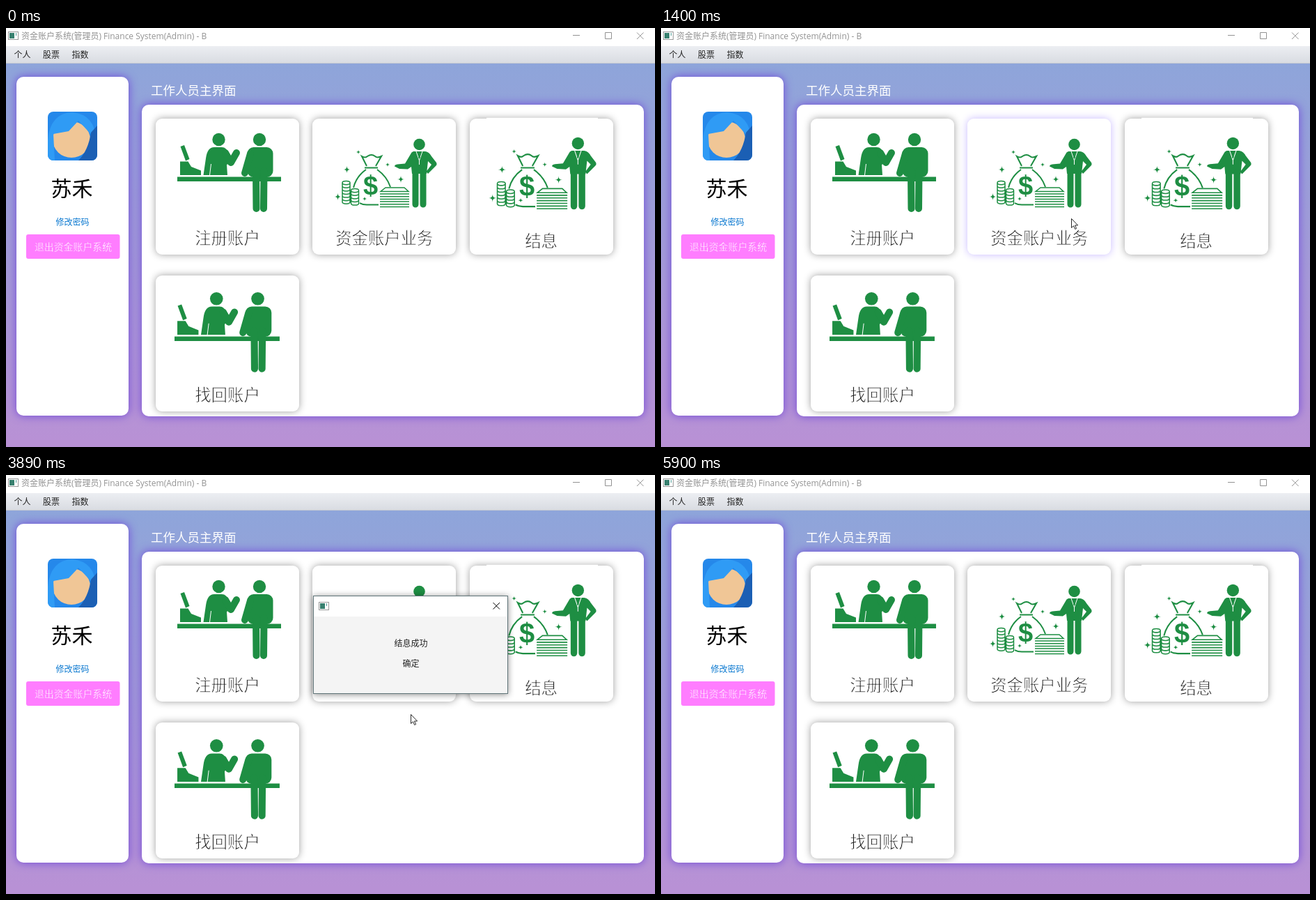
An HTML page that plays this animation: 932 by 601 pixels, repeating every 6010 ms.

```html
<!DOCTYPE html>
<html lang="zh-CN">
<head>
<meta charset="utf-8">
<title>资金账户系统</title>
<style>
html, body { margin: 0; width: 100%; height: 100%; overflow: hidden; }
#app { position: absolute; left: 0; top: 0; width: 932px; height: 601px; overflow: hidden;
  background: linear-gradient(#8ea5da 50px, #b891d5 590px); }
#app div, svg { position: absolute; }
.title { width: 932px; height: 26px; background: #fff; }
.menu { top: 26px; width: 932px; height: 25px; background: linear-gradient(#eceef2, #d9dce2); border-bottom: 1px solid #c3c8d2; box-sizing: border-box; }
.panel { background: #fff; border-radius: 10px; box-shadow: 0 0 13px #7048d8; }
.side { left: 15px; top: 70px; width: 161px; height: 486px; }
.main { left: 195px; top: 110px; width: 721px; height: 447px; overflow: hidden; }
.card { width: 206px; height: 195.5px; border-radius: 9px; background: #fff; box-shadow: 0 0 11px rgba(0,0,0,.38); }
.card.hover { box-shadow: 0 0 12px #c8baff; }
.card.press { box-shadow: 0 0 12px 1px #8450ff; }
svg { left: 0; top: 0; }
text { font-family: "Open Sans", "Noto Sans CJK SC", "Noto Sans CJK", sans-serif; font-size: 12px; }
.mid { text-anchor: middle; }
/* a background-coloured outline thins the strokes */
.label { font-size: 23.4px; fill: #111; stroke: #fff; stroke-width: .8; text-anchor: middle; }
.exit { font-size: 13.9px; fill: #fff; stroke: #ff7dff; stroke-width: .35; text-anchor: middle; }
.icon { fill: #1e8e43; }
.line { fill: none; stroke: #1e8e43; stroke-width: 2; }
.thin { stroke-width: 1.5; }
.limb { fill: none; stroke: #1e8e43; stroke-width: 10; stroke-linecap: round; stroke-linejoin: round; }
.dialog { filter: drop-shadow(0 1px 5px rgba(0,0,0,.45)); }
</style>
</head>
<body>
<div id="app">
  <div class="title"></div>
  <div class="menu"></div>
  <div class="panel side"></div>
  <div class="panel main" id="main"></div>
  <svg width="932" height="601">
    <defs>
      <g id="win">
        <rect x=".5" y=".5" width="14" height="11" fill="#fff" stroke="#9a9a9a"/>
        <rect x="2" y="2" width="7" height="8" fill="#38806f"/>
        <path d="M11.5 2V6" stroke="#4a9b94"/>
      </g>
      <g id="desk" class="icon">
        <path d="M246 213.5H395V220H246ZM250.5 170 256 168 263.5 188 258 190.5ZM250 191.5H261.500L266 199 280 204.500V211H250Z"/>
        <circle cx="305.5" cy="160" r="9.2"/>
        <path d="M283.500 211 287 187Q289 171 299 171H310Q317 171 319 180V195L317 196 318 211Z"/>
        <path class="limb" d="M315 179 323 193 331 179"/>
        <path d="M292.500 211 294.500 195" stroke="#fff"/>
        <circle cx="364" cy="160" r="9.2"/>
        <rect x="346.5" y="171" width="37" height="43" rx="9"/>
        <path class="limb" d="M351 180 343 208M359 205 359.500 259M370.500 205 370 259"/>
      </g>
      <g id="money" class="icon">
        <path class="line" d="M518 198 511 184Q516 187 519 184 525 180 530 184 533 187 539 184L531 198M515 200.500H534M517 203Q503 213 499 229M533 203Q547 213 552 228M508 251Q512 253.500 518 253.500H535"/>
        <text x="523.500" y="239" class="mid" style="font:bold 38px 'Liberation Sans',Arial,sans-serif">$</text>
        <path class="line thin" d="M545 229H572L578 234.500H538Z"/>
        <g id="piles"></g>
        <circle cx="593.500" cy="167" r="8.3"/>
        <path d="M585 177H602Q608 178 611 184L618 193Q619.500 196 617 198L606 209 603.500 206 611 196 606 191 604 209H583L582 199 577 202.500 565 202 558 198.500Q558 196 562 195.500L573 194.500 581 181Q582 178 585 177Z"/>
        <path class="limb" style="stroke-width:9" d="M588 207V253M599 207V253"/>
        <path d="M589 177 593.500 190 598 177M593.500 190V196" fill="none" stroke="#fff"/>
        <path d="M592 179H595L594.500 187H592.500Z"/>
      </g>
      <clipPath id="round"><rect x="60" y="120" width="71" height="70" rx="8"/></clipPath>
    </defs>

    <use href="#win" x="3" y="5"/>
    <g id="bar">
      <text x="22" y="16">资金账户系统(管理员)</text>
      <text x="140" y="16">Finance System(Admin) - B</text>
      <path d="M814 10.500H824M860.500 6.500H869.500V15.500H860.500ZM906 6.500 915.500 16M915.500 6.500 906 16" fill="none" stroke="currentColor"/>
    </g>
    <g fill="#222">
      <text x="11.500" y="43">个人</text><text x="53" y="43">股票</text><text x="94.500" y="43">指数</text>
    </g>

    <g clip-path="url(#round)">
      <path d="M60 120H131V190H60Z" fill="#2588ea"/>
      <ellipse cx="94" cy="160" rx="27" ry="26" fill="#f0c696"/>
      <path d="M60 160Q64 122 95 121 128 124 129 160L104 133 90 148 68 152 70 190H60Z" fill="#2f9bf5"/>
      <path d="M122 150 131 140V190H104Q118 176 122 150Z" fill="#1b5fb4"/>
    </g>
    <text x="94.500" y="241" class="mid" style="font-size:30px">苏禾</text>
    <text x="95.500" y="282.500" class="mid" fill="#0a78d0">修改密码</text>
    <rect id="focus" x="26.500" y="267.500" width="139" height="21" fill="none" stroke="#0c93d8" stroke-dasharray="3 2"/>
    <rect x="29" y="296" width="134.500" height="35" rx="3" fill="#ff7dff"/>
    <text class="exit" x="96.500" y="319">退出资金账户系统</text>
    <text x="208" y="95.700" fill="#fff" style="font-size:17.500px">工作人员主界面</text>

    <rect x="690" y="128.800" width="160" height="3" fill="#fff"/>
    <use href="#desk"/>
    <use href="#desk" transform="translate(242 443) scale(1.013) translate(-246 -214)"/>
    <use href="#money"/>
    <use href="#money" transform="translate(694 156) scale(1.048) translate(-472 -158)"/>
    <g id="labels"></g>

    <g id="dialog">
      <g class="dialog">
        <rect x="441.500" y="173.500" width="279" height="140" fill="#f4f4f4" stroke="#5f7478"/>
        <path d="M442 174H720V203H442Z" fill="#fff"/>
      </g>
      <use href="#win" x="449" y="182"/>
      <path d="M699.500 183 709 192.500M709 183 699.500 192.500" stroke="#000"/>
      <text x="581.500" y="245.500" class="mid" fill="#222">结息成功</text>
      <text x="581.500" y="275" class="mid" fill="#222">确定</text>
    </g>
    <path id="cursor" d="M.5.5V13.500L3.500 10.800 5.700 15.500 7.600 14.600 5.500 10H9.600Z" fill="#fff" stroke="#111" stroke-width=".9"/>
  </svg>
</div>
<script>
const $ = id => document.getElementById(id);
const W = 206, H = 195.5, PITCH = 225.3, LOOP = 6010, TICK = 78;

// Cards on a three-column grid, each with its caption
const cards = ['注册账户', '资金账户业务', '结息', '找回账户'].map((name, i) => {
  const x = 215 + PITCH * (i % 3), y = 129.5 + PITCH * Math.floor(i / 3);
  const el = document.createElement('div');
  el.className = 'card';
  el.style.cssText = `left:${x - 195}px;top:${y - 110}px`;
  $('main').append(el);
  const drop = name === '结息' ? 184.5 : 180;
  $('labels').innerHTML += `<text class="label" x="${x + W / 2}" y="${y + drop}">${name}</text>`;
  return { el, x, y };
});

// Parts of the money icon: coin stacks, banknotes, sparkles
const range = n => [...Array(n).keys()];
const coins = (x, y, n) => `M${x} ${y}a5.5 2.5 0 0 1 11 0` +
  range(n).map(i => `M${x} ${y + i * 4.6}q0 2.7 5.5 2.7t5.5-2.7`.replace('t5.5-2.7', 'q5.500 0 5.500-2.700')).join('') +
  `M${x} ${y}v${n * 4.6 - 4}m11 0v${4 - n * 4.6}`;
const notes = range(6).map(i => `M537 ${238 + i * 3.7}h42`).join('');
const spark = ([x, y], i) => {
  const r = i % 2 ? 5.2 : 3.4;
  return `M${x} ${y - r}Q${x} ${y} ${x + r} ${y}Q${x} ${y} ${x} ${y + r}Q${x} ${y} ${x - r} ${y}Q${x} ${y} ${x} ${y - r}`;
};
const sparks = [[506, 178], [489.5, 203], [548, 196], [567, 217], [515, 245], [476.5, 242]];
$('piles').innerHTML =
  `<path class="line thin" d="${coins(483, 222, 7) + coins(495.5, 233, 5) + notes}"/><path d="${sparks.map(spark).join('')}"/>`;

// Pointer route: tick, x, y
const route = [
  [0, 745, 535], [3, 690, 290], [5, 493, 299], [11, 325, 420], [14, 680, 300], [16, 589, 273],
  [22, 747, 287], [25, 747, 287], [29, 786, 400], [32, 790, 414], [35, 790, 414], [39, 738, 422],
  [44, 690, 422], [48, 581, 343], [53, 590, 270], [58, 590, 270], [62, 609, 285], [65, 839, 511], [71, 890, 601]
];

function pointer(k) {
  const i = Math.max(1, route.findIndex(p => p[0] >= k));
  const a = route[i - 1], b = route[i];
  const f = (k - a[0]) / (b[0] - a[0]);
  return [1, 2].map(j => Math.round(a[j] + (b[j] - a[j]) * f));
}

const show = (el, on) => el.style.display = on ? '' : 'none';

function draw(now) {
  const k = Math.floor((now % LOOP - 127) / TICK);
  const within = (a, b) => k >= a && k < b;
  const visible = within(0, 71), busy = within(21, 40), modal = within(40, 60), done = within(60, 74);
  const [x, y] = visible ? pointer(k) : [-99, -99];

  show($('cursor'), visible);
  $('cursor').setAttribute('transform', `translate(${x} ${y})`);
  show($('dialog'), modal);
  show($('focus'), busy || done);
  $('bar').style.color = $('bar').style.fill = within(21, 39) || done ? '#000' : '#929292';

  cards.forEach((card, i) => {
    const over = x >= card.x && x < card.x + W && y >= card.y && y < card.y + H;
    card.el.classList.toggle('press', busy && i === 2);
    card.el.classList.toggle('hover', over && !busy && !modal);
  });
  requestAnimationFrame(draw);
}
requestAnimationFrame(draw);
</script>
</body>
</html>
```
